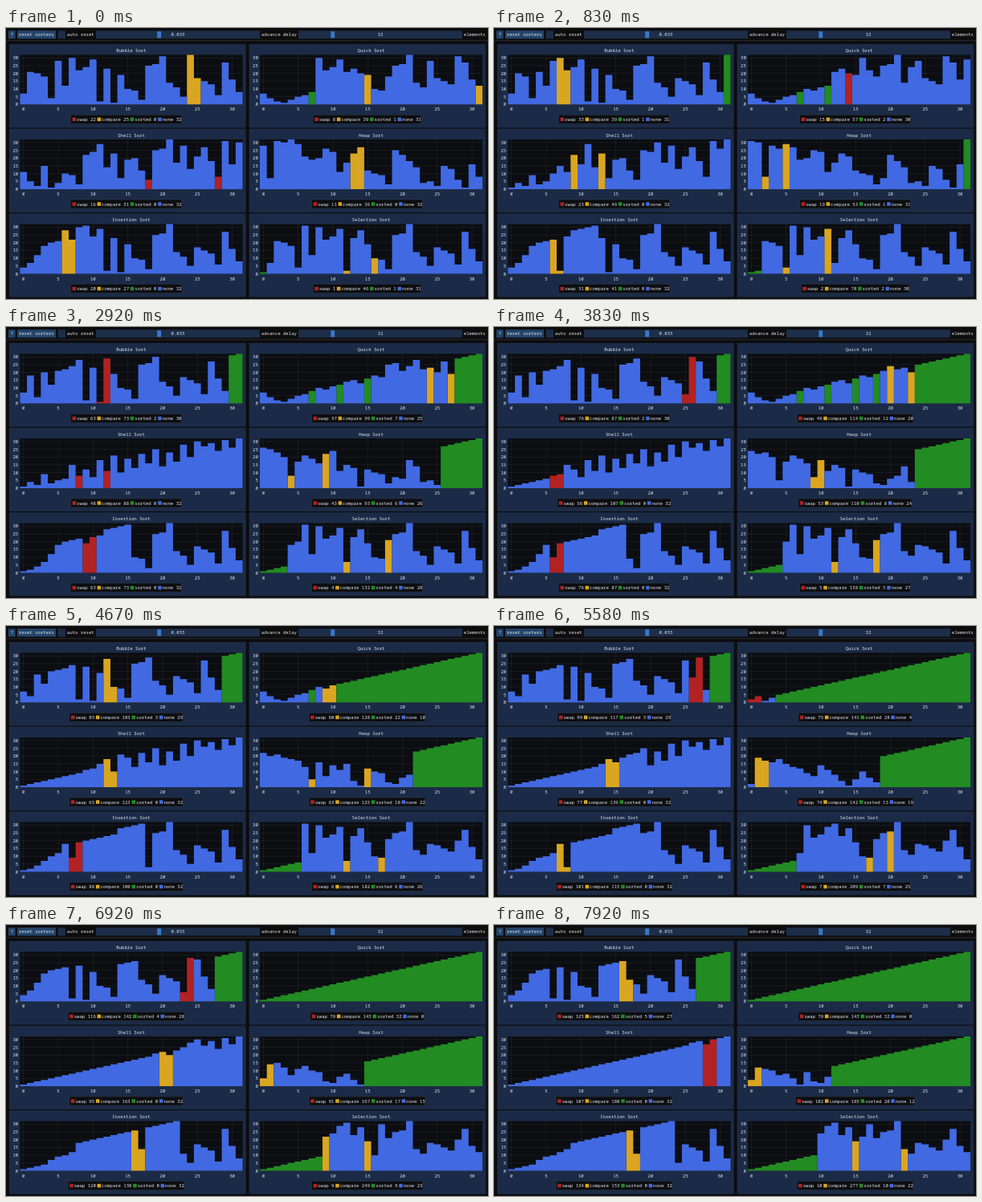
These frames come from a looping animation (600x338 px, 8 s). An HTML page:

```html
<!DOCTYPE html>
<html lang="en">
<head>
<meta charset="utf-8">
<title>Sorting visualizer</title>
<style>
  html, body { margin: 0; width: 100%; height: 100%; overflow: hidden; background: #0d0d0e; }
  svg { display: block; width: 100%; height: 100%; }
  text { font: 5.67px "Noto Sans Mono", "DejaVu Sans Mono", monospace; fill: #e4e6ea; white-space: pre; }
</style>
</head>
<body>
<svg id="stage" viewBox="0 0 600 338"></svg>
<script>
const LOOP = 8000, FPS = 12, CHAR = 3.4;
const START = [28, 7, 21, 20, 18, 4, 31, 12, 30, 22, 24, 29, 2, 23, 1, 19,
  10, 9, 3, 25, 26, 32, 14, 11, 5, 17, 15, 13, 6, 27, 16, 8];
const COUNT = START.length;
const COLORS = { swap: '#b22222', compare: '#daa520', sorted: '#228b22', none: '#4169e1' };
const KINDS = Object.keys(COLORS);
// [picture index, operations done]
const PACE = [[0, 47], [21, 100], [35, 136], [46, 163], [67, 216], [83, 258], [95, 287]];

// ---- sorting ----
const sorts = {
  'Bubble Sort'({ greater, swap, settle }) {
    for (let end = COUNT - 1; end > 0; end--) {
      for (let j = 0; j < end; j++) if (greater(j, j + 1)) swap(j, j + 1);
      settle(end);
    }
  },
  'Quick Sort'({ greater, swap, settle }) {
    (function sort(lo, hi) {
      if (lo > hi) return;
      if (lo === hi) return settle(lo);
      let edge = lo;
      for (let j = lo; j < hi; j++) if (greater(hi, j)) swap(edge++, j);
      swap(edge, hi);
      settle(edge);
      sort(edge + 1, hi);
      sort(lo, edge - 1);
    })(0, COUNT - 1);
  },
  'Shell Sort'({ greater, swap }) {
    for (const gap of [23, 10, 4, 1]) insertion(gap, greater, swap);
  },
  'Heap Sort'({ greater, swap, settle }) {
    function sift(root, size) {
      for (;;) {
        let top = root;
        for (const child of [2 * root + 1, 2 * root + 2])
          if (child < size && greater(child, top)) top = child;
        if (top === root) return;
        swap(root, top);
        root = top;
      }
    }
    for (let i = COUNT / 2 - 1; i >= 0; i--) sift(i, COUNT);
    for (let end = COUNT - 1; end > 0; end--) {
      swap(0, end);
      settle(end);
      sift(0, end);
    }
  },
  'Insertion Sort'({ greater, swap }) {
    insertion(1, greater, swap);
  },
  'Selection Sort'({ greater, swap, settle }) {
    for (let i = 0; i < COUNT - 1; i++) {
      let least = i;
      for (let j = i + 1; j < COUNT; j++) if (greater(least, j)) least = j;
      swap(i, least);
      settle(i);
    }
  }
};

function insertion(gap, greater, swap) {
  for (let i = gap; i < COUNT; i++)
    for (let j = i; j >= gap && greater(j - gap, j); j -= gap) swap(j - gap, j);
}

// Runs a sort and keeps a snapshot after every operation.
function record(sort) {
  const data = [...START], done = new Set(), log = [];
  const totals = { swap: 0, compare: 0 };
  function snap(kind, pair) {
    if (kind) totals[kind]++;
    log.push({
      data: [...data],
      marks: data.map((_, i) => pair.includes(i) ? kind : done.has(i) ? 'sorted' : 'none'),
      totals: { ...totals, sorted: done.size, none: COUNT - done.size }
    });
  }
  sort({
    greater(i, j) { snap('compare', [i, j]); return data[i] > data[j]; },
    swap(i, j) { [data[i], data[j]] = [data[j], data[i]]; snap('swap', [i, j]); },
    settle(i) { done.add(i); }
  });
  snap(null, []);
  return log;
}

// ---- drawing ----
const stage = document.getElementById('stage');

function add(tag, attrs, content = '') {
  const node = document.createElementNS('http://www.w3.org/2000/svg', tag);
  set(node, attrs);
  node.textContent = content;
  return stage.appendChild(node);
}
function set(node, attrs) {
  for (const key in attrs) node.setAttribute(key, attrs[key]);
}
const box = (x, y, width, height, fill, more) => add('rect', { x, y, width, height, fill, ...more });
const label = (x, middle, content, anchor = 'start') =>
  add('text', { x, y: middle + 2, 'text-anchor': anchor }, content);

function toolbar() {
  const button = '#24456d', field = '#1c2e49', grab = '#3878c8';
  box(3, 3.3, 8.6, 10, button);
  label(7.4, 8.4, '?', 'middle');
  box(14, 3.3, 48, 10, button);
  label(15.8, 8.4, 'reset sorters');
  box(64.5, 3.3, 9.5, 10, field);
  label(75.8, 8.4, 'auto reset');
  for (const [x, knob, value, name] of [[112, 188.2, '0.033', 'advance delay'], [364, 404.2, '32', 'elements']]) {
    box(x, 3.3, 204, 10, field);
    box(knob, 4.2, 5, 8.2, grab);
    label(x + 102, 8.4, value, 'middle');
    label(x + 205.8, 8.4, name);
  }
  box(0, 15.4, 600, 0.8, '#33333c');
}

function makeChart(name, index) {
  const dx = index % 2 * 298.6, dy = Math.floor(index / 2) * 105.6;
  const left = 17.4 + dx, base = 95.3 + dy, pitch = 8.66, unit = 1.935;
  const width = pitch * COUNT, height = unit * COUNT;
  const log = record(sorts[name]);

  box(4 + dx, 20 + dy, 294.6, 104.4, '#1b2b47');
  box(left, base - height, width, height, '#0b0d11');
  label(left + width / 2, 28 + dy, name, 'middle');
  for (let v = 0; v <= 30; v += 5) {
    const x = left + (v + 0.5) * pitch, y = base - v * unit;
    box(left, y - 0.25, width, 0.5, '#fff', { opacity: 0.1 });
    box(x - 0.25, base - height, 0.5, height, '#fff', { opacity: 0.1 });
    label(left - 2.2, y, v, 'end');
    label(x, base + 6, v, 'middle');
  }

  const bars = KINDS.map(kind => add('path', { fill: COLORS[kind] }));
  const middle = 113.9 + dy;
  const frame = box(0, middle - 5.5, 0, 11, '#0d0e11', { stroke: '#30343f', 'stroke-width': 0.5 });
  const legend = KINDS.map(kind => ({
    swatch: box(0, middle - 2.2, 4.5, 4.5, COLORS[kind]),
    text: label(0, middle, '')
  }));

  return operations => {
    const { data, marks, totals } = log[Math.min(operations, log.length) - 1];
    KINDS.forEach((kind, k) => {
      const d = data.map((value, i) => marks[i] !== kind ? '' :
        `M${left + i * pitch} ${base}v${-value * unit}h${pitch}v${value * unit}z`);
      bars[k].setAttribute('d', d.join(''));
    });

    const words = KINDS.map(kind => `${kind} ${totals[kind]}`);
    const total = words.reduce((sum, word) => sum + word.length * CHAR + 7.2, 0);
    let x = 149.5 + dx * 300 / 298.6 - total / 2;
    set(frame, { x, width: total });
    words.forEach((word, k) => {
      set(legend[k].swatch, { x: x + 1.9 });
      set(legend[k].text, { x: x + 7.4 });
      legend[k].text.textContent = word;
      x += word.length * CHAR + 7.2;
    });
  };
}

// ---- playback ----
function operationsAt(picture) {
  const next = Math.max(1, PACE.findIndex(([at]) => at >= picture));
  const [[p0, n0], [p1, n1]] = [PACE[next - 1], PACE[next]];
  return Math.round(n0 + (n1 - n0) * (picture - p0) / (p1 - p0));
}

toolbar();
const charts = Object.keys(sorts).map(makeChart);
let shown = -1;

function show(time) {
  const last = LOOP / 1000 * FPS - 1;
  const picture = Math.min(last, Math.floor((time % LOOP + 5) * FPS / 1000));
  if (picture === shown) return;
  shown = picture;
  charts.forEach(draw => draw(operationsAt(picture)));
}

const origin = performance.now();
function tick() {
  show(performance.now() - origin);
  requestAnimationFrame(tick);
}
tick();
</script>
</body>
</html>
```
